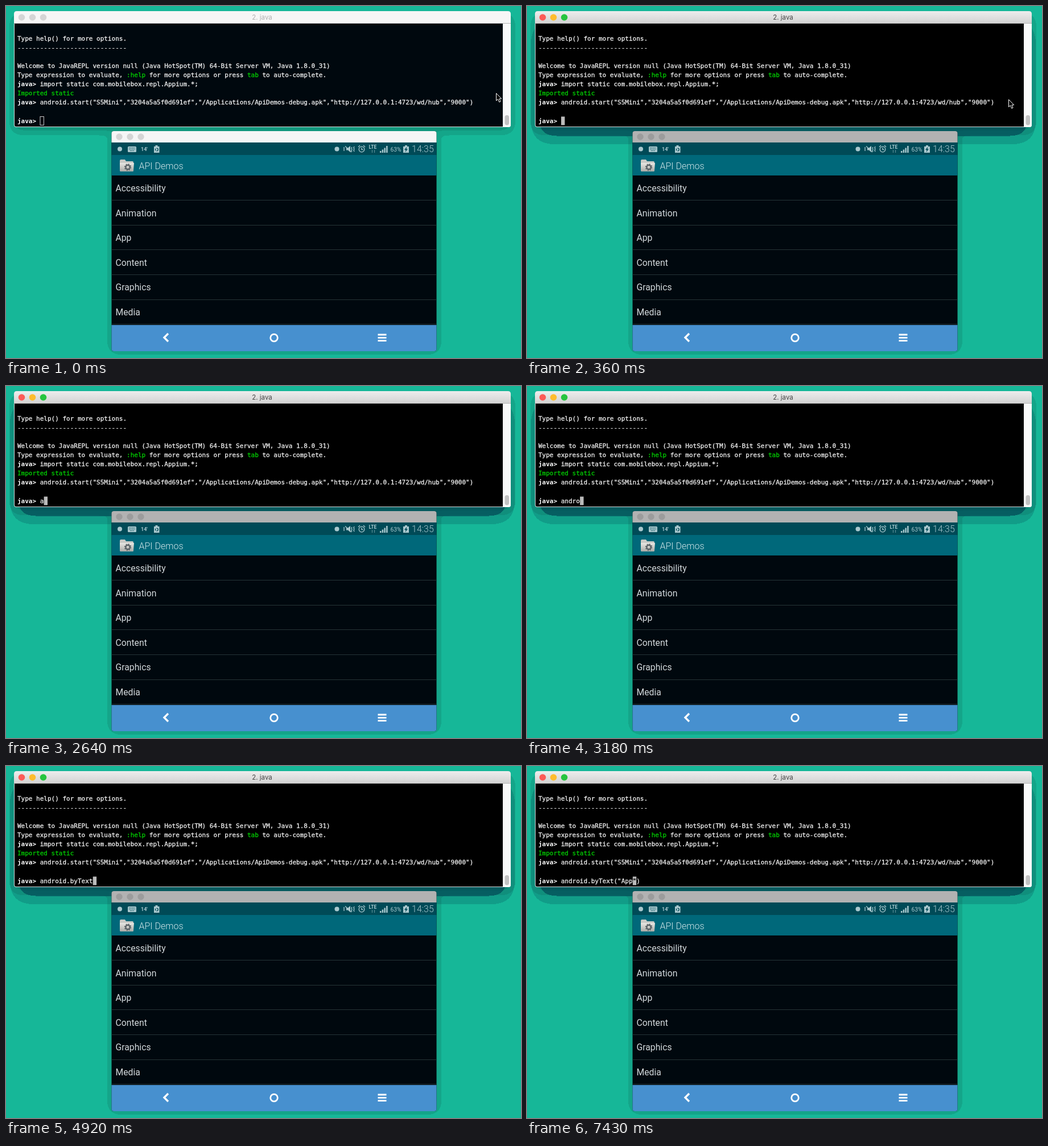
Recreate the animation shown at these times as an HTML page. Size 905 by 619 pixels, loop 8 s.

```html
<!DOCTYPE html>
<html lang="en">
<head>
<meta charset="utf-8">
<title>Java REPL and phone</title>
<style>
  html, body { margin: 0; width: 100%; height: 100%; overflow: hidden; background: #16b798; }
  svg { display: block; width: 905px; height: 619px; }
  text { white-space: pre; }
  .mono { font: 11px "DejaVu Sans Mono", monospace; }
  .mono text { fill: #f0f0f0; stroke: #f0f0f0; stroke-width: .3; }
  .mono .prompt { font-weight: bold; fill: #fff; stroke: none; }
  .mono .key { fill: #00d000; stroke: #00d000; }
  .title { font: 11.5px Inter, sans-serif; text-anchor: middle; }
  .phone { font: 15.75px Roboto, sans-serif; fill: #d3d9dc; }
  .status { font-family: Roboto, sans-serif; fill: #a9c8ce; }
  .line { fill: none; stroke: #a9c8ce; stroke-width: 1.3; }
  .nav { fill: none; stroke: #fff; stroke-width: 2.8; }
</style>
</head>
<body>
<svg viewBox="0 0 905 619">
  <defs>
    <linearGradient id="bar" x2="0" y2="1">
      <stop stop-color="#ededed"/><stop offset="1" stop-color="#d2d2d2"/>
    </linearGradient>
    <linearGradient id="metal" x2="0" y2="1">
      <stop stop-color="#e8e8e4"/><stop offset="1" stop-color="#a9aaa6"/>
    </linearGradient>
    <!-- blurred shadows cut into flat bands -->
    <filter id="soft" x="-20%" y="-20%" width="140%" height="140%" color-interpolation-filters="sRGB">
      <feGaussianBlur stdDeviation="9"/>
      <feComponentTransfer><feFuncA type="discrete" tableValues="0 .1 .1 .18 .18 .18"/></feComponentTransfer>
    </filter>
    <filter id="wide" x="-20%" y="-50%" width="140%" height="200%" color-interpolation-filters="sRGB">
      <feGaussianBlur stdDeviation="17"/>
      <feComponentTransfer><feFuncA type="discrete" tableValues="0 .22 .7"/></feComponentTransfer>
    </filter>
    <clipPath id="device"><rect x="185.500" y="220" width="571" height="387" rx="4"/></clipPath>
  </defs>

  <g filter="url(#soft)">
    <rect x="14" y="20" width="873" height="199" rx="6"/>
    <rect x="186" y="228" width="571" height="377" rx="6"/>
  </g>
  <g id="focusShadow" filter="url(#wide)">
    <rect x="14" y="32" width="873" height="204" rx="6" fill="#003f50"/>
  </g>

  <g clip-path="url(#device)">
    <path fill="#00080e" d="M185 220h572v390H185z"/>
    <path id="phoneBar" d="M185 220h572v20H185z"/>
    <path fill="#004a57" d="M185 240h572v22H185z"/>
    <path fill="#00687a" d="M185 262h572v36H185z"/>
    <path fill="#4790cf" d="M185 561h572v46H185z"/>
    <g id="phoneLights">
      <circle cx="199" cy="230" r="5.700"/><circle cx="218" cy="230" r="5.700"/><circle cx="237" cy="230" r="5.700"/>
    </g>
    <g id="list" class="phone"></g>
    <text class="phone" x="233.500" y="287" style="font-size:16px;font-weight:300;fill:#d2e6e9">API Demos</text>

    <!-- folder -->
    <path fill="#c9cac6" d="M200 272q0-2 2-2h7l2 3h11q2 0 2 2v14q0 2-2 2h-20q-2 0-2-2z"/>
    <path fill="url(#metal)" d="M200 276h25l-1 13q0 2-2 2h-20q-2 0-2-2z"/>
    <circle cx="214" cy="283.500" r="3.700" fill="none" stroke="#5c6468" stroke-width="2.400"/>
    <circle cx="214" cy="283.500" r="5.300" fill="none" stroke="#5c6468" stroke-width="1.800" stroke-dasharray="2.080"/>

    <!-- status bar -->
    <g class="status">
      <circle cx="200" cy="251.500" r="4"/>
      <rect x="214" y="247" width="15" height="10" rx="1.500"/>
      <path stroke="#004a57" stroke-dasharray="1.500 1" d="M216 249.500h11M216 252h11M218 254.500h7"/>
      <text x="237" y="255" font-size="9" font-weight="bold">14'</text>
      <path d="M260 247h2.500v-2h4v2h3v11h-9.500z"/>
      <circle cx="264.800" cy="252.500" r="2.300" fill="none" stroke="#004a57" stroke-width="1.300" stroke-dasharray="3.500 1.300"/>
      <circle cx="581.500" cy="251.500" r="4"/>
      <path d="M598 249.500h3l4-3.500v11l-4-3.500h-3z"/>
      <path class="line" d="M594 248v7M596 246.500l11 10.500M608 248l-1 2 1 2-1 2 1 2M612 247l-1 2.500 1 2-1 2 1 2.500"/>
      <circle class="line" cx="625" cy="252" r="4.800"/>
      <path class="line" d="M625 249v3.500h2.500M619 248l3-3M631 248l-3-3"/>
      <text x="637.500" y="251" font-size="8.500" font-weight="bold">LTE</text>
      <path class="line" opacity=".5" d="M643.500 253v5M647.500 253v5"/>
      <path d="M657 255h2.500v3H657zM660.700 252.500h2.500v5.500h-2.500zM664.400 249.500h2.500v8.500h-2.500zM668.100 246h2.500v12h-2.500z"/>
      <text x="675.500" y="255.500" font-size="10.300">63%</text>
      <path d="M698 247h3v-2h4v2h3v11h-10z"/>
      <path fill="#004a57" d="M704.500 247.500l-4.500 5.500h2.500l-1 4 4.500-5.500h-2.500z"/>
      <text x="713" y="257.300" font-size="16" font-weight="300">14:35</text>
    </g>

    <g class="nav">
      <path stroke-width="3.400" d="M285 576l-7 7 7 7"/>
      <circle cx="471" cy="583.500" r="6.300"/>
      <path d="M653.500 578h15M653.500 583.300h15M653.500 588.600h15"/>
    </g>
  </g>

  <rect x="14" y="20" width="873" height="193" rx="4" fill="#d6dcdc"/>
  <path id="screen" d="M15 30h858v182H18q-3 0-3-3z"/>
  <path fill="#fafafa" d="M873 30h14v179q0 4-4 4h-10z"/>
  <rect x="876.500" y="192" width="7.500" height="17.500" rx="3.700" fill="#c2c2c2"/>
  <path id="titleBar" d="M14 31V14q0-5 5-5H882q5 0 5 5V31z"/>
  <path fill="#b5b5b5" d="M14 30h873v1H14z"/>
  <g id="lights">
    <circle cx="27.500" cy="20" r="5.800"/><circle cx="46.500" cy="20" r="5.800"/><circle cx="65.500" cy="20" r="5.800"/>
  </g>
  <text id="name" class="title" x="450" y="24">2. java</text>

  <g class="mono">
    <text x="20" y="61">Type help() for more options.</text>
    <text x="20" y="77">-----------------------------</text>
    <text x="20" y="109">Welcome to JavaREPL version null (Java HotSpot(TM) 64-Bit Server VM, Java 1.8.0_31)</text>
    <text x="20" y="125">Type expression to evaluate, <tspan class="key">:help</tspan> for more options or press <tspan class="key">tab</tspan> to auto-complete.</text>
    <text x="20" y="141"><tspan class="prompt">java&gt;</tspan> import static com.mobilebox.repl.Appium.*;</text>
    <text x="20" y="157" class="key">Imported static</text>
    <text x="20" y="173"><tspan class="prompt">java&gt;</tspan> android.start("S5Mini","3204a5a5f0d691ef","/Applications/ApiDemos-debug.apk","http://127.0.0.1:4723/wd/hub","9000")</text>
    <rect id="caret" y="194.500" width="6.400" height="15"/>
    <text x="20" y="205.500"><tspan class="prompt">java&gt;</tspan> <tspan id="before"></tspan><tspan id="under" fill="#000" stroke="#000"></tspan><tspan id="after"></tspan></text>
  </g>

  <path id="mouse" fill="#000" stroke="#fff" d="M.5.500V13.500L3.500 10.800 5.700 16 8 15 5.900 10H9.700z"/>
</svg>
<script>
const LOOP = 8000, FOCUS = 360, CELL = 6.622;
const $ = id => document.getElementById(id);

// "<" moves the caret one cell left
const keys = [
  [2640, "a"], [2820, "n"], [2880, "d"], [3060, "r"], [3180, "o"], [3240, "i"], [3360, "d"], [3420, "."],
  [4080, "b"], [4260, "y"], [4500, "T"], [4620, "e"], [4800, "x"], [4920, "t"],
  [5520, "("], [5640, ")"], [5990, "<"], [6350, '"'], [6470, '"'], [6770, "<"],
  [6950, "A"], [7250, "p"], [7430, "p"]
];
const mousePath = [[0, 861, 153], [60, 852, 160], [180, 846, 164], [720, 859, 171], [780, -50, 0]];

$("list").innerHTML = ["Accessibility", "Animation", "App", "Content", "Graphics", "Media"].map((label, i) => {
  const y = 298 + i * 43.6;
  return `<text x="192.500" y="${y + 28}">${label}</text><path fill="#263437" d="M185 ${Math.round(y + 43.2)}h572v1H185z"/>`;
}).join("");

function typed(time) {
  let text = "", at = 0;
  for (const [start, key] of keys) {
    if (start > time) break;
    if (key === "<") at--;
    else text = text.slice(0, at) + key + text.slice(at++);
  }
  return { text, at };
}

function set(id, attrs) {
  for (const name in attrs) $(id).setAttribute(name, attrs[name]);
}

function draw(time) {
  const active = time >= FOCUS;
  set("focusShadow", { visibility: active ? "visible" : "hidden" });
  set("phoneBar", { fill: active ? "#b2b2b2" : "#f6f6f6" });
  set("phoneLights", { fill: active ? "#9c9c9c" : "#d5d5d5" });
  set("screen", { fill: active ? "#000" : "#00080e" });
  set("titleBar", { fill: active ? "url(#bar)" : "#f6f6f6" });
  set("name", { fill: active ? "#444" : "#b0b0b0" });
  ["#fc5b57", "#fdbc2e", "#27c53f"].forEach((color, i) =>
    $("lights").children[i].setAttribute("fill", active ? color : "#d5d5d5"));

  const { text, at } = typed(time);
  $("before").textContent = text.slice(0, at);
  $("under").textContent = text.slice(at, at + 1);
  $("after").textContent = text.slice(at + 1);
  set("caret", { x: 60 + at * CELL, fill: active ? "#bbb" : "none", stroke: active ? "none" : "#ccc" });

  const [, x, y] = mousePath.findLast(step => step[0] <= time);
  set("mouse", { transform: `translate(${x} ${y})` });
}

function tick() {
  draw(performance.now() % LOOP);
  requestAnimationFrame(tick);
}
tick();
</script>
</body>
</html>
```
